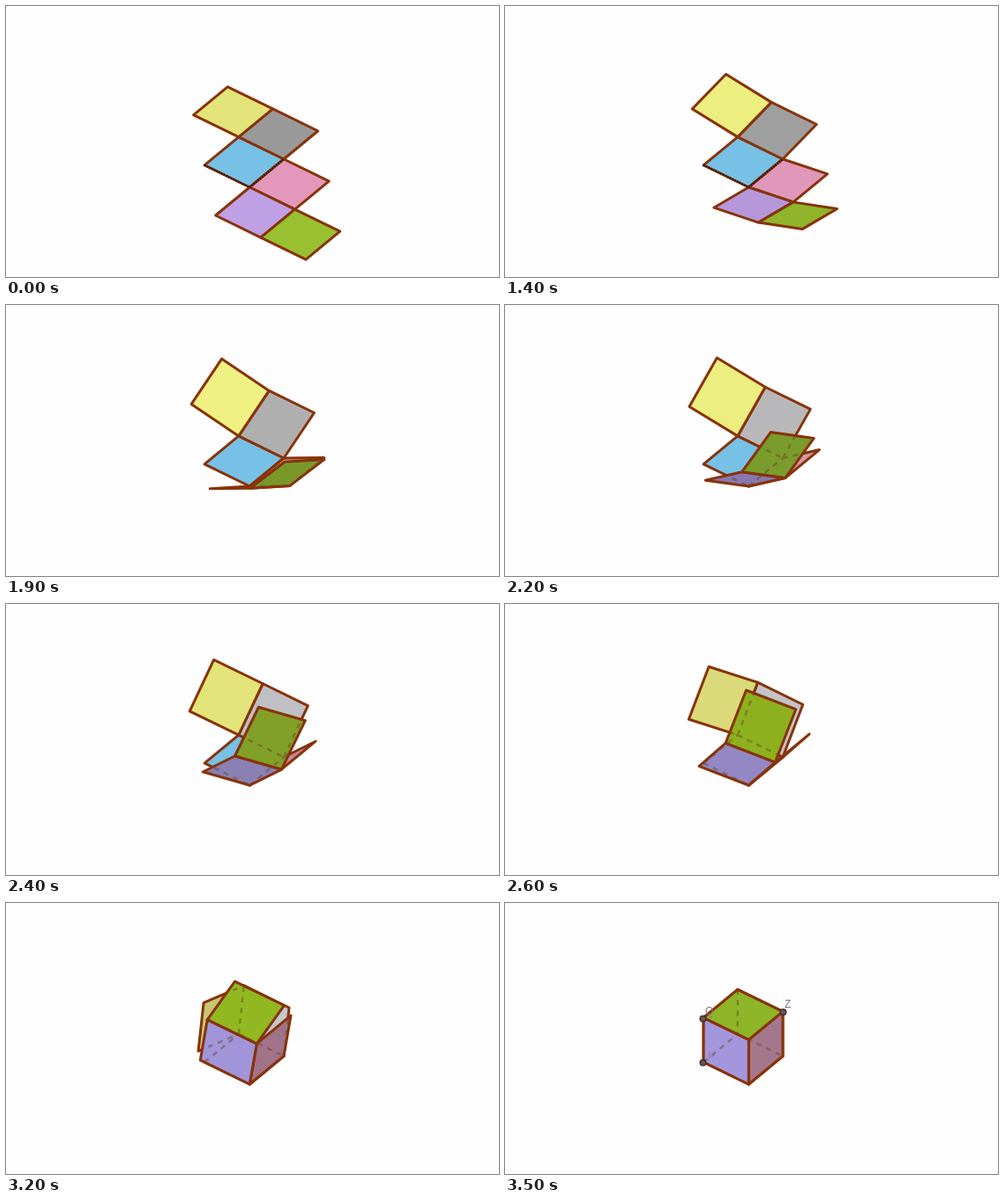
An HTML page with a canvas for the animation above (4900 ms loop, 559 by 308 pixels).

```html
<!DOCTYPE html>
<html lang="en">
<head>
<meta charset="utf-8">
<title>Folding cube net</title>
<style>
  html, body { margin: 0; width: 100%; height: 100%; overflow: hidden; background: #fefefe; }
  canvas { display: block; }
</style>
</head>
<body>
<canvas id="stage" width="559" height="308"></canvas>
<script>
const ctx = document.getElementById('stage').getContext('2d');
const LOOP = 4900;
const starts = [0, 1400, 1700, 1900, 2200, 2400, 2600, 2800, 3000, 3200, 3500];
const EDGE = '#87330b';

// Screen projections of the cube's unit vectors and the base's lower corner
const a = [51.2, 25.1], b = [-38.7, 32], z = [0, -50.6];
const C = [276.3, 206];

// Fill of each face at these fold steps, blended in between
const steps = [0, 1, 2, 4, 5, 7, 10];
const fills = {
  blue: ['77c0e6'],
  grey: ['999999', '9f9f9f', 'a6a6a6', 'b8b8ba', 'bfbfc4', 'c6c6ce', 'c6c6ce'],
  yellow: ['e2e47a', 'ecee80', 'f4f486', 'ecee80', 'e2e47a', 'd2d07a', 'c4c070'],
  pink: ['e398bb', 'e098ba', 'dc94b8', 'd49aa0', 'c48a94', '9c6a80', 'a4788c'],
  purple: ['c0a0e4', 'b698da', 'a88fcc', '8878b0', '8a80b4', '9c90d4', 'a496dc'],
  green: ['98c030', '90b42c', '7a9428', '7a9c2c', '82a028', '98c014', '8eb428']
};

const add = (...vs) => vs.reduce((p, q) => [p[0] + q[0], p[1] + q[1]]);
const neg = v => [-v[0], -v[1]];
const mix = (u, v, t) => [0, 1].map(i => u[i] * Math.cos(t) + v[i] * Math.sin(t));

function fillAt(name, k) {
  const list = fills[name];
  if (list.length === 1) return '#' + list[0];
  const i = Math.min(steps.findLastIndex(s => s <= k), steps.length - 2);
  const f = (k - steps[i]) / (steps[i + 1] - steps[i]);
  const part = (hex, j) => parseInt(hex.substr(j * 2, 2), 16);
  const rgb = [0, 1, 2].map(j =>
    Math.round(part(list[i], j) * (1 - f) + part(list[i + 1], j) * f));
  return `rgb(${rgb})`;
}

// Faces from back to front; every hinge is folded by the same angle
function facesAt(t) {
  const A = add(C, neg(a), neg(b)), B = add(C, neg(b));
  const quad = (p, u, v) => [p, add(p, u), add(p, u, v), add(p, v)];
  const grey = mix(neg(b), z, t), greyUp = mix(z, b, t);
  const yellow = mix(neg(a), greyUp, t);
  const pink = mix(a, z, t), pinkUp = mix(z, neg(a), t);
  const purple = mix(b, pinkUp, t), purpleUp = mix(pinkUp, neg(b), t);
  const green = mix(pink, purpleUp, t);
  return {
    blue: quad(A, a, b),
    grey: quad(A, a, grey),
    yellow: quad(A, grey, yellow),
    pink: quad(B, b, pink),
    purple: quad(C, pink, purple),
    green: quad(add(C, pink), green, purple)
  };
}

function outline(points) {
  const path = new Path2D();
  points.forEach(p => path.lineTo(...p));
  path.closePath();
  return path;
}

// Collect each edge once, always in the same direction
function addEdges(edges, q) {
  q.forEach((p, i) => {
    const pair = [p, q[(i + 1) % 4]].sort((m, n) =>
      Math.round(m[0] - n[0]) || m[1] - n[1]);
    edges.set(pair.flat().map(Math.round).join(), pair);
  });
}

function drawFaces(k) {
  const edges = new Map();
  for (const [name, q] of Object.entries(facesAt(k * Math.PI / 20))) {
    const shape = outline(q);
    ctx.fillStyle = fillAt(name, k);
    ctx.fill(shape);
    if (k > 2) {
      ctx.save();
      ctx.clip(shape);
      ctx.setLineDash([6, 6]);
      ctx.lineWidth = 2.5;
      ctx.strokeStyle = 'rgba(95, 60, 25, .42)';
      ctx.beginPath();
      for (const [p, r] of edges.values()) {
        ctx.moveTo(...p);
        ctx.lineTo(...r);
      }
      ctx.stroke();
      ctx.restore();
    }
    ctx.lineWidth = 3;
    ctx.strokeStyle = EDGE;
    ctx.stroke(shape);
    addEdges(edges, q);
  }
}

function drawDottedEdges() {
  ctx.save();
  ctx.setLineDash([1.5, 1.5]);
  ctx.lineWidth = 2;
  ctx.strokeStyle = '#111';
  ctx.beginPath();
  ctx.moveTo(...add(C, neg(a)));
  ctx.lineTo(...C);
  ctx.lineTo(...add(C, neg(b)));
  ctx.stroke();
  ctx.restore();
}

function drawPoints() {
  ctx.font = '12px "Liberation Sans", Arial, sans-serif';
  const label = (text, x, y, color) => {
    ctx.fillStyle = color;
    ctx.fillText(text, x, y);
  };
  label('Q', 227, 127, '#8a7480');
  label('Z', 317, 119, '#806c86');
  label('P', 230, 178, 'rgba(120, 95, 150, .4)');
  ctx.lineWidth = 1.5;
  ctx.strokeStyle = '#3c3030';
  ctx.fillStyle = '#6a5552';
  for (const [x, y] of [[224.5, 131.5], [224.5, 181.5], [315.5, 124]]) {
    ctx.beginPath();
    ctx.arc(x, y, 3.3, 0, 7);
    ctx.fill();
    ctx.stroke();
  }
}

function frame(now) {
  const k = starts.findLastIndex(s => s <= now % LOOP);
  ctx.fillStyle = '#fefefe';
  ctx.fillRect(0, 0, 559, 308);
  ctx.lineJoin = 'round';
  drawFaces(k);
  if (k < 2) drawDottedEdges();
  if (k === 10) drawPoints();
  requestAnimationFrame(frame);
}

frame(0);
</script>
</body>
</html>
```
